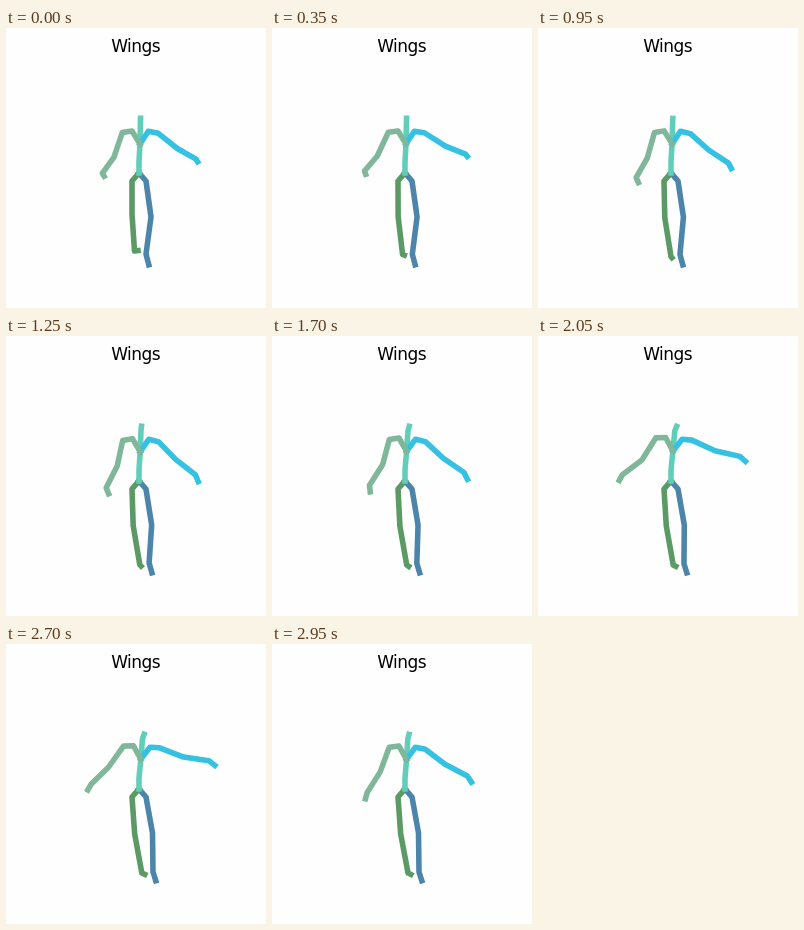
Write an HTML page that moves like this. It is 260 px wide and 280 px high and loops after 3000 ms.

```html
<!DOCTYPE html>
<html lang="en">
<head>
<meta charset="utf-8">
<title>Wings</title>
<style>
  html, body { margin: 0; width: 100%; height: 100%; overflow: hidden; background: #fefefe; }
  svg { display: block; width: 260px; height: 280px; }
  polyline { fill: none; stroke-width: 5.56; stroke-linecap: square; stroke-linejoin: round; }
  text { font: 17px "DejaVu Sans", sans-serif; letter-spacing: -0.5px; text-anchor: middle; fill: #000; }
</style>
</head>
<body>
<svg viewBox="0 0 260 280">
  <text x="129.7" y="24">Wings</text>
  <g id="figure"></g>
</svg>
<script>
const LOOP = 3000, STEP = 50;

const bump = (t, center, width) => Math.exp(-(((t - center) / width) ** 2) / 2);
const approach = (t, tau) => 1 - Math.exp(-t / tau);
function smooth(t, from, to) {
  const u = Math.min(1, Math.max(0, (t - from) / (to - from)));
  return u * u * (3 - 2 * u);
}

// A small flap, then a full one.
const flap = t => 0.38 * bump(t, 400, 370) + bump(t, 2400, 330);

// Chains bones of [length, degrees below horizontal]; side is 1 for right, -1 for left.
function chain([x, y], side, bones) {
  return bones.map(([length, degrees]) => {
    const a = degrees * Math.PI / 180;
    x += side * length * Math.cos(a);
    y += length * Math.sin(a);
    return [x, y];
  });
}

function pose(t) {
  const lift = flap(t), lead = flap(t + 80);
  const sway = bump(t, 2300, 600);
  const reach = smooth(t, 400, 1300);
  const settle = smooth(t, 0, 2700);
  const drop = approach(t, 400);

  const pelvis = [133, 145];
  const chest = [134 + sway, 116 - sway];
  const rightAnkle = [140 + 7 * settle, 226 + 2 * settle];
  const rightShoulder = [152.3 + 1.7 * sway, 106 - 3.3 * lift];
  const leftShoulder = [116.3 + 1.7 * sway, 105 - 2.2 * sway - 2 * lift];

  return [
    ["#4D84AA", [
      pelvis, [140, 153], [145 + 1.5 * settle, 189],
      rightAnkle, [rightAnkle[0] + 2.8, 236.8]
    ]],
    ["#5B9965", [
      pelvis, [126, 153], [126 + 2.7 * settle, 186 + 4 * drop],
      [128.5 + 8.2 * approach(t, 1200), 223 + 6 * drop],
      [132 + 6.8 * settle, 222.6 + 7.8 * drop]
    ]],
    ["#61CEB9", [
      pelvis, [133, 134], chest,
      [134.4 + 2.6 * sway, 95], [134.5 + 4.5 * sway, 90.3]
    ]],
    ["#34C1E2", [
      chest, [142.3 + 2 * sway, 103.2], rightShoulder,
      ...chain(rightShoulder, 1, [
        [24.3 + 2 * lift, 47 - 39 * lift],
        [21 + 4 * reach + lift, 39.4 - 47 * lift],
        [3 + 4.5 * reach, 68 - 45 * lift]
      ])
    ]],
    ["#80B79A", [
      chest, [126 + 1.8 * sway, 103 - 1.6 * sway], leftShoulder,
      ...chain(leftShoulder, -1, [
        [26.2, 79 - 37 * lift],
        [19.7 + 4.7 * reach, 64 - 38 * lead],
        [3.5 + 3 * reach, 136 - 18 * t / 1000 - 52 * lead]
      ])
    ]]
  ];
}

const figure = document.getElementById("figure");
const lines = pose(0).map(([color]) => {
  const line = document.createElementNS("http://www.w3.org/2000/svg", "polyline");
  line.setAttribute("stroke", color);
  return figure.appendChild(line);
});

function draw(t) {
  pose(t).forEach(([, points], i) => lines[i].setAttribute("points", points.join(" ")));
}

// The figure moves in steps of 50 ms.
const start = performance.now();
function tick() {
  const t = (performance.now() - start) % LOOP;
  draw(Math.floor(t / STEP) * STEP);
  requestAnimationFrame(tick);
}
draw(0);
requestAnimationFrame(tick);
</script>
</body>
</html>
```
